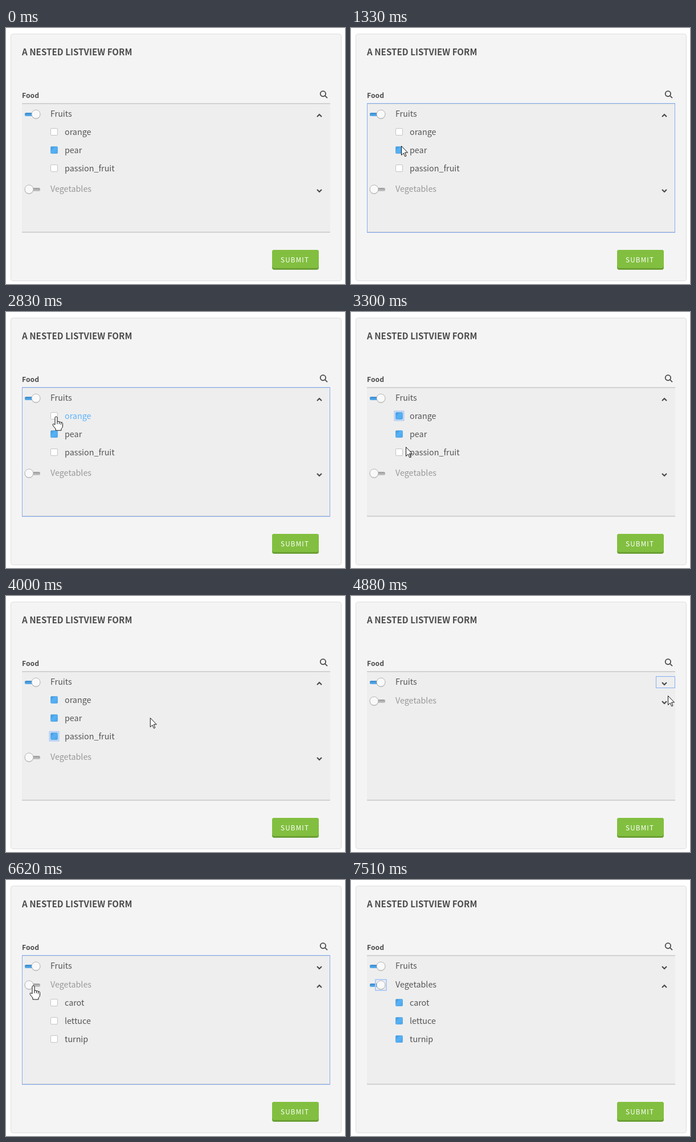
Recreate the animation shown at these times as an HTML page. Size 595 px wide and 450 px high, loop 8000 ms.

```html
<!DOCTYPE html>
<html lang="en">
<head>
<meta charset="utf-8">
<title>Nested list form</title>
<style>
  html, body { margin: 0; width: 100%; height: 100%; overflow: hidden; background: #fff; }
  svg { display: block; }
  text { font: 14.32px "Noto Sans CJK JP", "Noto Sans CJK SC", "Noto Sans CJK", sans-serif; fill: #555; }
  .title { font-size: 15.2px; font-weight: bold; fill: #4c4c4c; }
  .label { font-size: 12.2px; font-weight: bold; fill: #4c4c4c; }
  .button { font-size: 11.7px; font-weight: 500; letter-spacing: 1.2px; fill: #fff; }
  .off { fill: #999; }
  .hover { fill: #5cb3fd; }
  .icon { fill: none; stroke: #4a4a4a; stroke-width: 2.2; }
  .focus { fill: none; stroke: #84aef2; }
  .glow { fill: none; stroke: #b0cdf8; stroke-width: 2; }
  .cursor { fill: #fff; stroke: #111; stroke-linejoin: round; }
</style>
</head>
<body>
<svg width="595" height="450" viewBox="0 0 595 450">
  <defs>
    <linearGradient id="blue" x2="1" y2="1">
      <stop stop-color="#3f94d8"/><stop offset=".45" stop-color="#58b2f6"/><stop offset="1" stop-color="#4ba4ea"/>
    </linearGradient>
    <linearGradient id="track" x2="0" y2="1">
      <stop stop-color="#999"/><stop offset="1" stop-color="#c8c8c8"/>
    </linearGradient>
    <linearGradient id="trackOn" x2="0" y2="1">
      <stop stop-color="#3787c8"/><stop offset="1" stop-color="#5cb2f2"/>
    </linearGradient>
  </defs>
  <rect x="8.5" y="10.5" width="580" height="434" rx="4" fill="#f4f4f4" stroke="#ddd"/>
  <text class="title" x="28" y="48">A NESTED LISTVIEW FORM</text>
  <text class="label" x="28" y="123">Food</text>
  <g class="icon" style="stroke-width:1.8"><circle cx="556.4" cy="115.6" r="4.7"/><path d="M560 119.2l4 4"/></g>
  <path d="M28 132h541v228H28z" fill="#eee"/>
  <path d="M28 132.5h541M28 358.5h541" stroke="#ccc"/>
  <path d="M28 133.5h541M28 359.5h541" stroke="#d6d6d6"/>
  <rect x="467" y="390" width="82" height="35" rx="4" fill="#6a9f33"/>
  <rect x="467" y="390" width="82" height="32" rx="4" fill="#82bf40"/>
  <text class="button" x="482" y="412">SUBMIT</text>
  <g id="scene"></g>
</svg>
<script>
const LOOP = 8000;
const scene = document.getElementById('scene');

// Cursor way-points: time, x, y
const path = [
  [50, 427, 412], [560, 63, 214], [810, 87, 205], [1320, 87, 205], [1330, 88, 207], [1380, 88, 207],
  [1440, 88, 209], [2500, 88, 209], [2900, 88, 182], [3180, 88, 182], [3300, 96, 237], [3410, 96, 237],
  [3480, 90, 246], [3680, 90, 246], [4480, 550, 155], [4810, 550, 155], [4880, 556, 175], [4950, 556, 175],
  [5190, 93, 238], [5460, 554, 177], [5910, 554, 177], [6430, 48, 186], [7180, 48, 186], [7510, 432, 90]
];

// What holds the keyboard focus from each time on
const focusSteps = [
  [0, ''], [880, 'list'], [1650, 'pear'], [1830, 'list'], [2440, 'pear'], [2560, 'list'], [3130, 'orange'],
  [3540, 'passion_fruit'], [4560, 'Fruits arrow'], [5660, 'Vegetables arrow'], [6500, 'list'], [6700, 'Vegetables switch']
];

const clamp = v => Math.max(0, Math.min(1, v));
const ramp = (t, start) => clamp((t - start) / 120);

function cursorAt(t) {
  const i = path.findIndex(p => p[0] > t);
  if (i < 1) return null;
  const [t0, x0, y0] = path[i - 1], [t1, x1, y1] = path[i];
  const u = (t - t0) / (t1 - t0), k = u * u * (3 - 2 * u);
  return { x: x0 + (x1 - x0) * k, y: y0 + (y1 - y0) * k };
}

function stateAt(t) {
  const veg = ramp(t, 6800);
  return [
    { name: 'Fruits', on: 1 - ramp(t, 1700) + ramp(t, 2500), open: t < 4620, items: [
      ['orange', t >= 3170], ['pear', t < 1700 || t >= 2500], ['passion_fruit', t >= 3560]] },
    { name: 'Vegetables', on: veg, open: t >= 5720, items: [
      ['carot', veg > 0], ['lettuce', veg > 0], ['turnip', veg > 0]] }
  ];
}

const frame = (cls, x, y, w, h) => `<rect class="${cls}" x="${x}" y="${y}" width="${w}" height="${h}"/>`;
const label = (cls, x, y, text) => `<text class="${cls}" x="${x}" y="${y}">${text}</text>`;

function toggle(y, on) {
  const x = 40.5 + 12 * on;
  return `<rect x="33" y="${y - 2.5}" width="27" height="6" rx="2.5" fill="url(#track)"/>
    <rect x="33" y="${y - 2.5}" width="${x - 33}" height="6" rx="2.5" fill="url(#trackOn)"/>
    <circle cx="${x}" cy="${y + 1}" r="7.8" fill="#0002"/>
    <circle cx="${x}" cy="${y}" r="7.5" fill="#f9f9f9" stroke="#b4b4b4"/>`;
}

function checkbox(y, on) {
  return `<rect x="78.5" y="${y - 6}" width="12" height="12" rx="1.5"
    fill="${on ? 'url(#blue)' : '#fff'}" stroke="${on ? '#62abe4' : '#c4c4c4'}"/>`;
}

function chevron(y, open) {
  const d = open ? -4 : 4;
  return `<path class="icon" d="M546 ${y - d / 2}l4 ${d}l4 ${-d}"/>`;
}

function cursorShape({ x, y }, hand) {
  const d = hand
    ? 'M-2 1Q0-2 2 1V9Q4 7 5.5 9Q7.500 8 8.500 10Q11 9 11.500 12V17Q11 20 9 21V24H-1V21Q-4 18-6 14.500Q-6 11-2 14Z'
    : 'M.5.5V16.500L4.200 13L6.800 18.800L9 17.800L6.500 12H11.500Z';
  const lines = hand ? '<path d="M2 9v4M5.500 9v4M8.500 10v4"/>' : '';
  return `<g class="cursor" transform="translate(${x} ${y})"><path d="${d}"/>${lines}</g>`;
}

function render(t) {
  const cursor = cursorAt(t);
  const focus = focusSteps.findLast(s => s[0] <= t)[1];
  let hand = false, out = '', y = 151.5;

  const hit = (x0, x1, cy, reach) => {
    const inside = !!cursor && cursor.x >= x0 && cursor.x <= x1 && Math.abs(cursor.y - cy) <= reach;
    hand = hand || inside;
    return inside;
  };

  for (const { name, on, open, items } of stateAt(t)) {
    hit(33, 60, y, 8);
    hit(536, 568, y + 1, 9);
    out += toggle(y, on) + label(on > .5 ? '' : 'off', 78, y + 4.5, name) + chevron(y + 2.5, open);
    if (focus === name + ' arrow') out += frame('focus', 535.5, y - 10, 33, 20);
    if (focus === name + ' switch') out += frame('glow', 43, y - 9.5, 19, 19);
    if (open) items.forEach(([item, checked], i) => {
      const cy = y + 31 + 32 * i;
      out += checkbox(cy, checked) + label(hit(78, 190, cy, 7) ? 'hover' : '', 103, cy + 5.5, item);
      if (focus === item) out += frame('glow', 76.5, cy - 8, 16, 16);
    });
    y += open ? 132 : 33;
  }
  if (focus === 'list') out += frame('focus', 28.5, 132.5, 540, 227);
  if (cursor) out += cursorShape(cursor, hand);
  scene.innerHTML = out;
}

function tick() {
  render(performance.now() % LOOP);
  requestAnimationFrame(tick);
}
tick();
</script>
</body>
</html>
```
